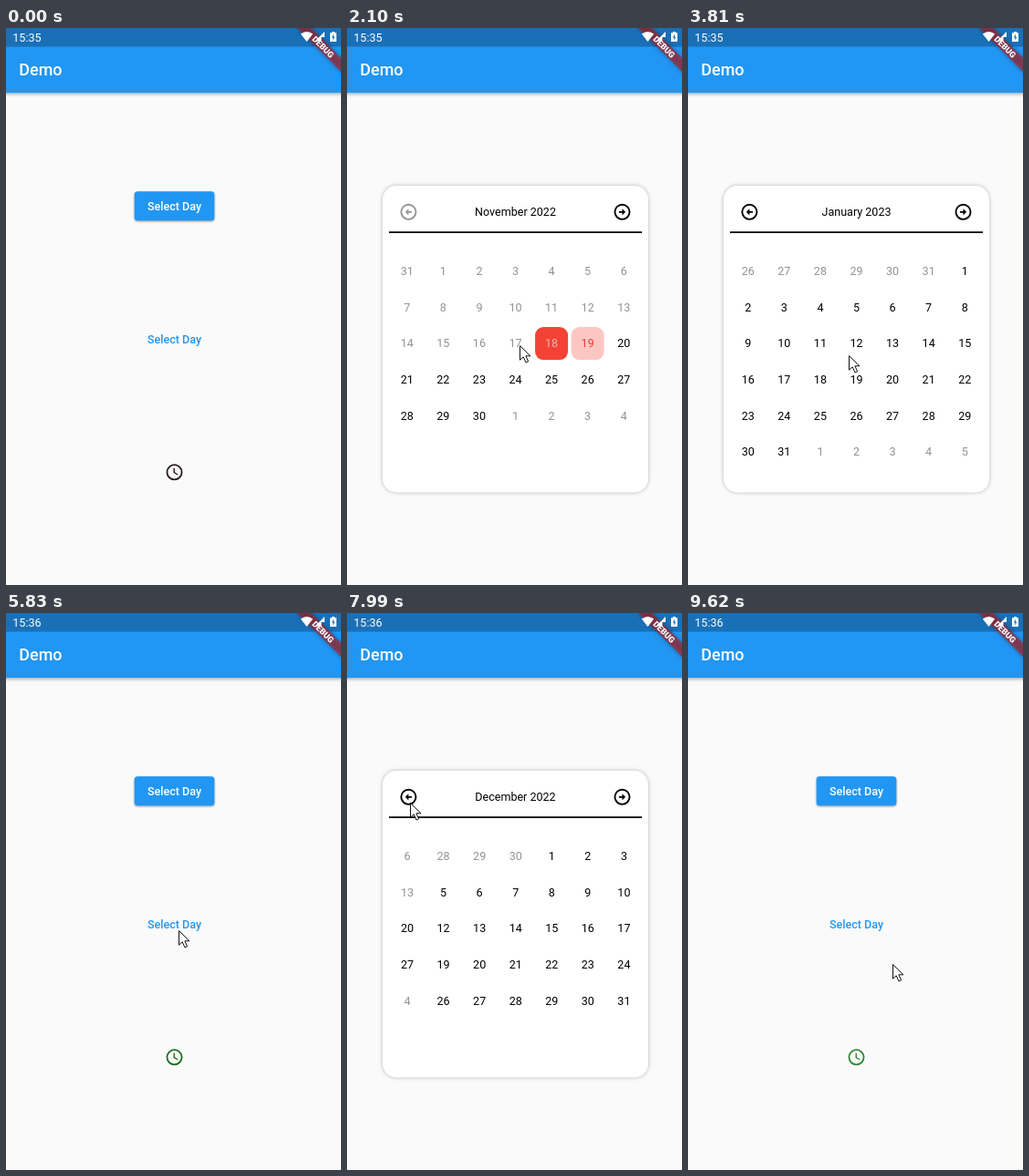
Write an HTML page that moves like this. It is 367 px wide and 611 px high and loops after 9920 ms.

```html
<!DOCTYPE html>
<html lang="en">
<head>
<meta charset="utf-8">
<title>Day picker demo</title>
<style>
  html, body { margin: 0; width: 100%; height: 100%; overflow: hidden; background: #fafafa; }
  svg { display: block; width: 100vw; height: 100vh; }
  text { font: 400 12.56px Roboto, sans-serif; }
  .mid { text-anchor: middle; }
  .medium { font-weight: 500; }
  .bar { filter: drop-shadow(0 1.5px 2px rgba(0, 0, 0, .4)); }
  .button { filter: drop-shadow(0 1.3px 1.2px rgba(0, 0, 0, .4)); }
  .card { filter: drop-shadow(0 0 2px rgba(0, 0, 0, .28)); }
  .ribbon { filter: drop-shadow(0 0 2.5px rgba(0, 0, 0, .5)); }
</style>
</head>
<body>
<svg viewBox="0 0 367 611" preserveAspectRatio="none">
  <defs>
    <clipPath id="pageClip"><rect x="46" y="247" width="277" height="238"/></clipPath>
    <g id="arrow">
      <circle r="9" fill="none" stroke="currentColor" stroke-width="2.1"/>
      <path d="M0-4L-4 0L0 4V1H4V-1H0Z" fill="currentColor"/>
    </g>
  </defs>

  <rect width="367" height="611" fill="#fafafa"/>
  <rect class="bar" x="-10" y="-10" width="387" height="81" fill="#2196f3"/>
  <rect width="367" height="20.5" fill="#1a70b7"/>
  <text x="14.35" y="52" fill="#fff" class="medium" style="font-size:17.94px">Demo</text>

  <g transform="translate(369 -.8) rotate(45)">
    <rect class="ribbon" x="-36" y="25.1" width="72" height="10.8" fill="#b71c1c" fill-opacity=".627"/>
    <text class="mid" y="33.7" fill="#fff" style="font-size:9.15px;font-weight:900">DEBUG</text>
  </g>

  <text id="clock" x="7.3" y="15" fill="#fff"></text>
  <g fill="#fff">
    <path d="M322.8 6.6Q329.5 1.6 336.2 6.6L329.5 15Z"/>
    <path d="M349 4V10H345.5V14.5H338.5Z"/>
    <path fill-rule="evenodd" d="M357 4H360V5.2H362V15H355V5.2H357ZM359 6.8L356.8 10.6H358.3V13.5L360.4 9.7H359Z"/>
  </g>

  <rect class="button" x="140.7" y="179.3" width="87.6" height="32" rx="3.5" fill="#2196f3"/>
  <text class="mid medium" x="184.5" y="200" fill="#fff">Select Day</text>
  <text class="mid medium" x="184.5" y="346" fill="#2196f3">Select Day</text>
  <g id="timeIcon" transform="translate(184.5 487.3) scale(.897)" fill="none" stroke="currentColor">
    <circle r="9" stroke-width="2"/>
    <path d="M-.3-5V.4L4 3" stroke-width="1.6"/>
  </g>

  <g id="dialog">
    <rect class="card" x="39" y="173" width="291" height="336.5" rx="15" fill="#fff"/>
    <g id="back" transform="translate(67.4 201.8) scale(.897)"><use href="#arrow"/></g>
    <g transform="translate(301.5 201.8) scale(-.897 .897)"><use href="#arrow"/></g>
    <text id="month" class="mid" x="184.5" y="206.2"></text>
    <rect x="46" y="223.2" width="277" height="1.8"/>
    <g clip-path="url(#pageClip)"><g id="pages"></g></g>
  </g>

  <path id="cursor" d="M.5.5V16.2L4.2 12.8L7 19L9.6 17.8L6.9 11.8H12Z" fill="#fff" stroke="#111"/>
</svg>
<script>
const LOOP = 9920, PAGE = 277, CELL = PAGE / 7, DAY = 864e5, TURN_TIME = 300;
const MONTHS = ["November 2022", "December 2022", "January 2023"];
const TODAY = Date.UTC(2022, 10, 18), TOMORROW = TODAY + DAY, NEW_PICK = Date.UTC(2023, 0, 12);
const FORWARD_CLICKS = [2500, 3030], BACK_CLICKS = [7140, 7912];
const OPENED = [1640, 5980], CLOSED = [4590, 9380];

const SPOT = {
  corner: [260, 567], textButton: [189, 348], next: [299, 207],
  overshoot: [176, 359], day12: [188, 343], previous: [69, 208], day25: [224, 385]
};
const MOVES = [
  { at: 80, time: 540, to: SPOT.textButton },
  { at: 2100, time: 340, to: SPOT.next },
  { at: 3330, time: 480, to: SPOT.overshoot },
  { at: 3810, time: 160, to: SPOT.day12 },
  { at: 5600, time: 80, to: SPOT.textButton },
  { at: 6060, time: 640, to: SPOT.previous },
  { at: 8300, time: 650, to: SPOT.day25 }
];

const $ = id => document.getElementById(id);
const clamp = x => Math.min(1, Math.max(0, x));

function add(parent, tag, attrs, content = "") {
  const node = document.createElementNS("http://www.w3.org/2000/svg", tag);
  for (const key in attrs) node.setAttribute(key, attrs[key]);
  node.textContent = content;
  return parent.appendChild(node);
}

// Each mark covers a plain day label while its dialog is open
const marks = { [TOMORROW]: "#f03a30", [NEW_PICK]: "#7d4b48" };
const picks = [];

function drawCell(page, time, inMonth, col, row) {
  const x = 46 + (col + .5) * CELL, y = 266.9 + row * CELL;
  const day = new Date(time).getUTCDate();
  const box = { x: x - 18, y: y - 18, width: 36, height: 36, rx: 9 };
  const label = { class: "mid", x, y: y + 4.4 };
  const isToday = inMonth && time === TODAY;
  const muted = !inMonth || time < TOMORROW;
  if (isToday) add(page, "rect", { ...box, fill: "#f44336" });
  add(page, "text", { ...label, fill: isToday ? "#e9b3ae" : muted ? "#929292" : "#000" }, day);
  if (!inMonth || !marks[time]) return;
  const mark = add(page, "g", {});
  add(mark, "rect", { ...box, fill: "#fff" });
  add(mark, "rect", { ...box, fill: "#fcc7c3" });
  add(mark, "text", { ...label, fill: marks[time] }, day);
  picks.push({ time, mark });
}

MONTHS.forEach((name, index) => {
  const page = add($("pages"), "g", { transform: `translate(${index * PAGE})` });
  const first = Date.UTC(2022, 10 + index, 1), end = Date.UTC(2022, 11 + index, 1);
  const monday = first - (new Date(first).getUTCDay() + 6) % 7 * DAY;
  const cells = Math.ceil((end - monday) / DAY / 7) * 7;
  for (let i = 0; i < cells; i++) {
    const time = monday + i * DAY;
    drawCell(page, time, time >= first && time < end, i % 7, Math.floor(i / 7));
  }
});

// Cubic bezier (.42, 0, .58, 1), solved for x by bisection
function easeInOut(x) {
  let low = 0, high = 1;
  for (let i = 0; i < 20; i++) {
    const s = (low + high) / 2, r = 1 - s;
    if (3 * r * r * s * .42 + 3 * r * s * s * .58 + s ** 3 < x) low = s; else high = s;
  }
  return low * low * (3 - 2 * low);
}

function pageAt(t) {
  const turned = clicks => clicks.reduce((sum, at) => sum + easeInOut(clamp((t - at) / TURN_TIME)), 0);
  return turned(FORWARD_CLICKS) - turned(BACK_CLICKS);
}

function pointerAt(t) {
  let [x, y] = SPOT.corner;
  for (const { at, time, to } of MOVES) {
    const k = easeInOut(clamp((t - at) / time));
    x += (to[0] - x) * k;
    y += (to[1] - y) * k;
  }
  return [Math.round(x), Math.round(y)];
}

function dialogOpacity(t) {
  const i = t < OPENED[1] ? 0 : 1;
  if (t < OPENED[i]) return 0;
  return t < CLOSED[i] ? 1 : t < CLOSED[i] + 70 ? .5 : 0;
}

function draw(t) {
  const page = pageAt(t), shown = Math.round(page);
  const picked = t < OPENED[1] ? TOMORROW : NEW_PICK;
  $("clock").textContent = t < 4420 ? "15:35" : "15:36";
  $("timeIcon").style.color = t < CLOSED[0] ? "#2a1a1c" : t < CLOSED[1] ? "#1b6d20" : "#2b8a30";
  $("dialog").setAttribute("opacity", dialogOpacity(t));
  $("month").textContent = MONTHS[shown];
  $("back").style.color = shown ? "#000" : "#949494";
  $("pages").setAttribute("transform", `translate(${-page * PAGE})`);
  for (const { time, mark } of picks) mark.style.display = time === picked ? "" : "none";
  $("cursor").style.display = t < MOVES[0].at ? "none" : "";
  $("cursor").setAttribute("transform", `translate(${pointerAt(t)})`);
}

const begin = performance.now();
function tick() {
  draw((performance.now() - begin) % LOOP);
  requestAnimationFrame(tick);
}
tick();
</script>
</body>
</html>
```
